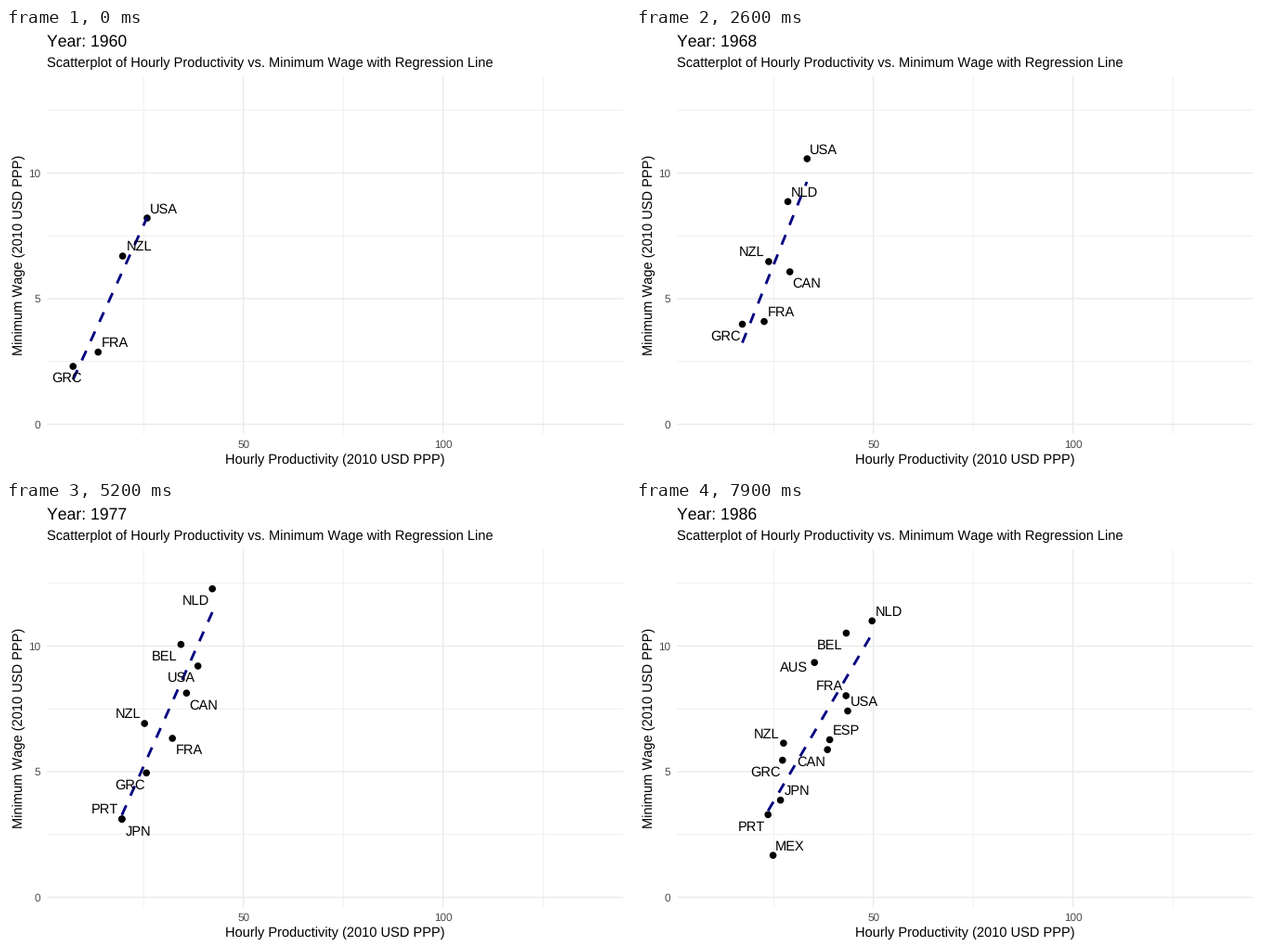
These frames come from a looping animation (672x480 px, 8000 ms). A matplotlib script:

```python
import numpy as np
import matplotlib.pyplot as plt
from matplotlib.animation import FuncAnimation
from matplotlib.patches import Circle

W, H, DPI = 672, 480, 100
FRAMES, STEP = 80, 100
PX = 72 / DPI  # points per pixel
plt.rcParams.update({
    "font.family": "Liberation Sans",
    "text.hinting": "none",
    "text.kerning_factor": 6,
    "toolbar": "None",
})

KEYS = [1960, 1965, 1968.33, 1973, 1977, 1980, 1986]
FIRST, LAST = KEYS[0], KEYS[-1]
HOLD = 0.75  # share of the way to the next pose before a label changes side

# Label offset (centre x, baseline y) for each side of a point
SIDES = {"ur": (18, -5.6), "ul": (-18, -5.6),
         "dr": (18, 17.2), "dl": (-18, 17.2), "l": (-22, 10)}

fig = plt.figure(figsize=(W / DPI, H / DPI), dpi=DPI, facecolor="white")
ax = fig.add_axes([0, 0, 1, 1])
ax.set_xlim(0, W)
ax.set_ylim(H, 0)
ax.axis("off")


def write(x, y, s, size=14.67, color="black", ha="left", **kw):
    return ax.text(x, y, s, fontsize=size * PX, color=color, ha=ha,
                   va="baseline", **kw)


class Country:
    """A labelled dot gliding between poses: one on entry, then one per key year."""

    def __init__(self, name, start, sides, *poses):
        self.years = np.array([start] + [k for k in KEYS if k > start])
        self.xs, self.ys = zip(*poses)
        self.sides = sides.split()
        self.turns = self.years[:-1] + HOLD * np.diff(self.years)
        self.dot = ax.add_patch(Circle((0, 0), 3.8, color="black", lw=0, zorder=3))
        self.label = write(0, 0, name, ha="center", zorder=5)

    def active(self, year):
        return year >= self.years[0] - 1e-6

    def at(self, year):
        return (np.interp(year, self.years, self.xs),
                np.interp(year, self.years, self.ys))

    def update(self, year):
        x, y = self.at(year)
        dx, dy = SIDES[self.sides[np.searchsorted(self.turns, year)]]
        self.dot.center = x, y
        self.label.set_position((max(x + dx, 65.5), y + dy))
        for art in (self.dot, self.label):
            art.set_visible(self.active(year))


countries = [
    Country("USA", 1960, "ur ur ur dl dl ur ur",
            (152, 205), (170.3, 166.8), (184.3, 141), (198, 190.5),
            (206.7, 178), (208.8, 180.2), (228, 226.5)),
    Country("GRC", 1960, "dl dl dl ur dl dr dl",
            (72.2, 365), (92.8, 349.8), (114.5, 319.5), (144, 316.6),
            (151.2, 293.3), (160.4, 293.8), (157.8, 279.6)),
    Country("FRA", 1960, "ur ur ur ul dr dl ul",
            (99.2, 349.6), (116.2, 346.4), (138, 316.6), (162.5, 288.6),
            (179.2, 256), (193.3, 244), (226.2, 210)),
    Country("NZL", 1960, "ur ur ul dl ul dl ul",
            (125.6, 246), (137.5, 253), (142.9, 252), (158.2, 204.2),
            (149.2, 240), (154.3, 271), (158.9, 261.2)),
    Country("NLD", 1964, "dl dl ur ur dl ur ur",
            (145, 208), (149.5, 203.2), (163.5, 187.3), (192.8, 141.2),
            (222.2, 94.7), (232.7, 87.2), (254.2, 129.3)),
    Country("CAN", 1965, "ur dr dl dr ur dl",
            (154, 284.3), (165.7, 263), (180, 233),
            (194.4, 207.2), (193.8, 237), (206.2, 268.2)),
    Country("BEL", 1975, "dl dl ur dl",
            (178, 161), (188.4, 154.7), (207, 155.6), (226.4, 142.5)),
    Country("JPN", 1975, "dr dr dr ur",
            (120, 344), (124.8, 343.2), (134.6, 336.4), (155.6, 322.7)),
    Country("PRT", 1975, "ul ul dl dl",
            (126, 325), (124.8, 343), (134.9, 316.5), (142.2, 338.3)),
    Country("MEX", 1981, "ur ur", (156, 355), (147.6, 382.2)),
    Country("ESP", 1981, "ur ur", (193, 252), (208.6, 257.5)),
    Country("AUS", 1985, "l l", (190, 173), (192.2, 174.2)),
]


def fit(year):
    """Ends of the least-squares line for one whole year."""
    x, y = np.array([c.at(year) for c in countries if c.active(year)]).T
    slope, base = np.polyfit(x, y, 1)
    ends = np.array([x.min(), x.max()])
    return np.array([ends, slope * ends + base])


fits = [fit(y) for y in range(FIRST, LAST + 2)]


def px(v):
    return 40.7 + 4.3 * v


def py(v):
    return 427.5 - 27.1 * v


def grid(xs, ys, width):
    style = dict(color="#EBEBEB", lw=width * PX, snap=False, zorder=1,
                 solid_capstyle="butt")
    for x in xs:
        ax.plot([px(x)] * 2, [52, 438], **style)
    for y in ys:
        ax.plot([44, 664.6], [py(y)] * 2, **style)


grid((25, 75, 125), (2.5, 7.5, 12.5), 0.71)
grid((50, 100), (0, 5, 10), 1.42)
for v in (50, 100):
    write(px(v), 453, v, 11.73, "#4D4D4D", "center")
for v in (0, 5, 10):
    write(37.2, py(v) + 4.3, v, 11.73, "#4D4D4D", "right")

write(354.4, 470, "Hourly Productivity (2010 USD PPP)", ha="center")
write(18, 245, "Minimum Wage (2010 USD PPP)", ha="center",
      rotation=90, rotation_mode="anchor")
write(44, 42, "Scatterplot of Hourly Productivity vs. Minimum Wage with Regression Line")
title = write(44, 20, "", 17.6)
trend, = ax.plot([], [], color="navy", lw=2.85 * PX, ls=(0, (4, 4)),
                 dash_capstyle="butt", zorder=4)


def draw(i):
    # Three steps a year; the first year takes four
    year = FIRST + (i / 4 if i < 4 else (i - 1) / 3)
    title.set_text(f"Year: {round(year)}")
    for c in countries:
        c.update(year)
    n, part = divmod(year - FIRST, 1)
    n = int(n)
    trend.set_data(*(fits[n] * (1 - part) + fits[n + 1] * part))
    return []


anim = FuncAnimation(fig, draw, frames=FRAMES, interval=STEP,
                     repeat=True, repeat_delay=0, blit=False)
plt.show()
```
